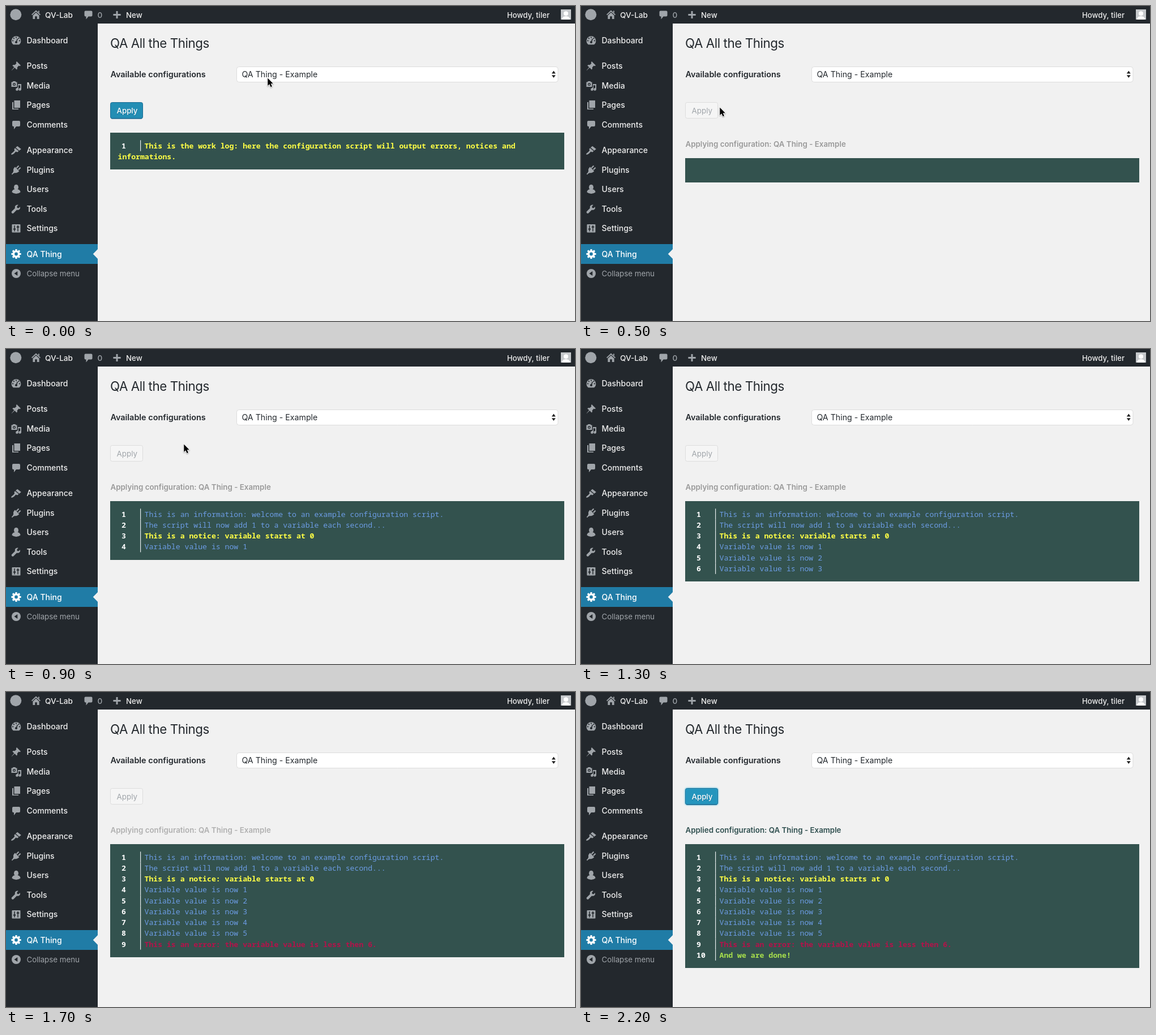
These frames come from a looping animation (1005x557 px, 2.4 s). An HTML page with a canvas:

```html
<!DOCTYPE html>
<html lang="en">
<head>
<meta charset="utf-8">
<title>QA All the Things</title>
<style>
html, body { margin: 0; width: 100%; height: 100%; overflow: hidden; background: #f1f1f1; }
canvas { display: block; width: 1005px; height: 557px; }
</style>
</head>
<body>
<canvas id="stage"></canvas>
<script>
const W = 1005, H = 557, LOOP = 2400, STEP = 100;
const SANS = 'Inter, Roboto, "Liberation Sans", sans-serif';
const MONO = '"Noto Sans Mono", "DejaVu Sans Mono", monospace';
const DARK = '#23282d', GREY = '#a0a5aa', PAGE = '#f1f1f1', BLUE = '#207ca6', SLATE = '#33524e';
const INFO = '#6c9ce4', NOTICE = '#ffff45', ERROR = '#b5124a', DONE = '#a8e04c';

const canvas = document.getElementById('stage');
const ctx = canvas.getContext('2d');
const dpr = window.devicePixelRatio || 1;
canvas.width = W * dpr;
canvas.height = H * dpr;

function text(str, x, y, color, size = 14, weight = 400, family = SANS) {
  ctx.font = `${weight} ${size}px ${family}`;
  ctx.fillStyle = color;
  ctx.fillText(str, x, y);
}

function rect(x, y, w, h, color) {
  ctx.fillStyle = color;
  ctx.fillRect(x, y, w, h);
}

function box(x, y, w, h, r, fill, stroke) {
  ctx.beginPath();
  ctx.roundRect(x, y, w, h, r);
  ctx.fillStyle = fill;
  ctx.fill();
  if (stroke) {
    ctx.strokeStyle = stroke;
    ctx.lineWidth = 1;
    ctx.stroke();
  }
}

function disc(x, y, r, color) {
  ctx.beginPath();
  ctx.arc(x, y, r, 0, Math.PI * 2);
  ctx.fillStyle = color;
  ctx.fill();
}

function shape(d, color) {
  ctx.fillStyle = color;
  ctx.fill(new Path2D(d));
}

function line(d, color, width) {
  ctx.strokeStyle = color;
  ctx.lineWidth = width;
  ctx.stroke(new Path2D(d));
}

function glow(color, blur, dy, draw) {
  ctx.save();
  ctx.shadowColor = color;
  ctx.shadowBlur = blur * dpr;
  ctx.shadowOffsetY = dy * dpr;
  draw();
  ctx.restore();
}

// Icons live in a 20 x 20 box.
const BUBBLE = 'M5 3h10q2 0 2 2v6q0 2-2 2h-5l-4 5v-5h-1q-2 0-2-2v-6q0-2 2-2z';
const icons = {
  dashboard() {
    shape('M4 16.6A8.4 8.4 0 1 1 16 16.6Q15.5 17.2 14.5 17.2H5.5Q4.5 17.2 4 16.6z', GREY);
    [[10, 4.6], [5.9, 6.2], [4.1, 10.4], [15.9, 10.4], [14.4, 6.2]].forEach(p => disc(...p, 1.1, DARK));
    disc(10, 13, 2.1, DARK);
    line('M10 13L12.4 7', DARK, 1.6);
  },
  pin() {
    shape('M11 2L18 9L16.4 10.2L14.6 9.6L11.8 12.4Q12.6 15 10.8 16.6L7.3 13.1L2 18L1.8 17.7L6.4 12.3L3.2 9.2Q5 7.5 7.6 8.2L10.4 5.4L9.8 3.4z', GREY);
  },
  media() {
    shape('M1.5 3.5h2l1-1.5h4l1 1.5h2v8.5h-10z', GREY);
    disc(6.5, 7.6, 2.5, DARK);
    disc(6.5, 7.6, 1.2, GREY);
    shape('M13 7h6v9.3a2.3 2.3 0 1 1-1.8-2.2V9.3h-3.2v7.2a2.4 2.4 0 1 1-2-2.4V13H13z', GREY);
  },
  pages() {
    shape('M6.5 2H17v13H6.5z M3 5h2v11.5h9V18H3z', GREY);
  },
  bubble() {
    shape(BUBBLE, GREY);
  },
  brush() {
    shape('M9 5.2L12.2 2.8L18.8 8L15.4 10.8z M8 6.2L14.4 11.6L12.2 13.6L9.2 12.4Q5.4 17.6 1.6 17.9Q.8 16.7 1.7 15.7Q5.5 13.3 7.2 10.6L6.4 8z', GREY);
  },
  plug() {
    shape('M8 4.6L15.3 12Q12.3 16 8 14.9L5.2 16.1L3 18.2L1.8 17L4 14.8L5.2 12Q4 7.8 8 4.6z', GREY);
    line('M10.5 6.4L14.5 2.5M13.8 9.6L17.6 5.8', GREY, 2.1);
  },
  user() {
    shape('M10 1.8a4 4.6 0 0 1 2.6 8.1q4.9 1.1 4.9 5.4q-3 2.7-7.5 2.7t-7.5-2.7q0-4.3 4.9-5.4A4 4.6 0 0 1 10 1.8z', GREY);
  },
  wrench() {
    shape('M16.8 5.9L14.2 8.4L11.7 7.9L11.2 5.5L13.8 2.8Q10.8 1.8 8.7 4Q7.2 5.8 7.9 8.4L1.9 14.4Q1.2 16 2.4 17.2Q3.7 18.3 5.1 17.4L11 11.5Q13.8 12.2 15.6 10.7Q17.7 8.7 16.8 5.9z', GREY);
  },
  sliders() {
    box(2.5, 3, 15, 14.5, 1, GREY);
    line('M7 5v10.5M13 5v10.5', DARK, 1.5);
    line('M4.8 11.6h4.4M10.8 7.7h4.4', DARK, 2);
  },
  gear() {
    for (let i = 0; i < 8; i++) {
      ctx.save();
      ctx.translate(10, 10);
      ctx.rotate(i * Math.PI / 4);
      shape('M-1.9-5L-1.5-8.6h3L1.9-5z', '#fff');
      ctx.restore();
    }
    disc(10, 10, 6.3, '#fff');
    disc(10, 10, 2.9, BLUE);
  },
  collapse() {
    disc(10, 10, 8, GREY);
    shape('M12.3 6v8L6.5 10z', DARK);
  },
  home() {
    shape('M10 2L18 9.6L16.8 10.8L10 4.5L3.2 10.8L2 9.6z M13.8 3h2v4l-2-2z M10 6L15.6 11.2V17.6H11.8V12.8H8.2V17.6H4.4V11.2z', GREY);
  },
  plus() {
    line('M10 3.4v13.2M3.4 10h13.2', GREY, 3);
  }
};

function icon(name, cx, cy) {
  ctx.save();
  ctx.translate(cx - 10, cy - 10);
  icons[name]();
  ctx.restore();
}

const menu = [
  ['Dashboard', 'dashboard', 61], ['Posts', 'pin', 106], ['Media', 'media', 141],
  ['Pages', 'pages', 175], ['Comments', 'bubble', 210], ['Appearance', 'brush', 255],
  ['Plugins', 'plug', 290], ['Users', 'user', 324], ['Tools', 'wrench', 359],
  ['Settings', 'sliders', 393], ['QA Thing', 'gear', 438.5]
];

function drawFrame() {
  rect(0, 0, W, H, PAGE);
  rect(0, 0, W, 31, DARK);
  rect(0, 0, 162, H, DARK);
  rect(0, 421, 162, 35, BLUE);
  shape('M162 430v17l-8.3-8.5z', PAGE);

  disc(17.3, 15.3, 10, GREY);
  icon('home', 53, 15.5);
  text('QV-Lab', 69, 20.5, '#eee', 13.6, 500);
  icon('bubble', 145.5, 15.5);
  text('0', 161.5, 20.5, GREY, 13.6, 500);
  icon('plus', 196, 15.5);
  text('New', 212, 20.5, '#eee', 13.3, 500);
  text('Howdy, tiler', 885, 20.5, '#eee', 13.2, 500);
  rect(980, 6, 18, 18, '#c6c9cc');
  disc(989, 13.2, 4, '#fff');
  shape('M982 24q0-6 7-6t7 6z', '#fff');

  for (const [label, name, y] of menu) {
    icon(name, 18, y);
    text(label, 36.5, y + 5, name === 'gear' ? '#fff' : '#eee', 14, 500);
  }
  icon('collapse', 18, 473);
  text('Collapse menu', 36.5, 478, GREY, 13.3);

  ctx.letterSpacing = '-0.4px';
  text('QA All the Things', 184, 74, DARK, 22.3);
  ctx.letterSpacing = '0px';
  text('Available configurations', 184.5, 125.5, DARK, 14.4, 600);
}

function drawSelect(focused) {
  const field = () => box(407.5, 107.5, 567.5, 27, 4, '#fff', focused ? '#5b9dd9' : '#dcdcdc');
  if (focused) glow('rgba(30,140,190,.8)', 3, 0, field);
  else field();
  text('QA Thing - Example', 416.5, 125.5, DARK, 14.2);
  shape('M963.8 119.4h7l-3.5-4.8z M963.8 122.2h7l-3.5 4.8z', '#222');
}

function drawOptions() {
  glow('rgba(0,0,0,.35)', 12, 4, () => box(397, 107, 569, 66.5, 5, '#ededed'));
  box(397, 107, 569, 66.5, 5, '#ededed', '#c2c2c2');
  line('M404.3 121.2l2.7 3.2l5-7', '#222', 1.5);
  ['Example', 'Failing Example', 'Fatal Error Example'].forEach((name, i) =>
    text('QA Thing - ' + name, 418.5, 125.3 + i * 19.4, '#222', 13.9));
}

function drawButton(state) {
  if (state === 'off') {
    box(184.5, 170.5, 57, 28, 3, '#f5f5f5', '#dddddd');
    text('Apply', 195.5, 189.5, GREY, 13.4);
    return;
  }
  const focused = state === 'focus';
  const face = () => box(184.5, 170.5, 57, 28.5, 3, focused ? '#2595bd' : '#238eb4', '#1c6c94');
  if (focused) glow('#33b3db', 3, 0, face);
  else face();
  rect(186, 198, 54, 1.5, '#1c6c94');
  glow('#1b6a90', 1, 1, () => text('Apply', 195.5, 189.5, '#fff', 13.3, 500));
}

const log = [
  [700, 'This is an information: welcome to an example configuration script.', INFO, 450],
  [700, 'The script will now add 1 to a variable each second...', INFO, 450],
  [700, 'This is a notice: variable starts at 0', NOTICE, 600],
  ...[1, 2, 3, 4, 5].map(n => [700 + n * 200, 'Variable value is now ' + n, INFO, 450]),
  [1700, 'This is an error: the variable value is less then 6.', ERROR, 600],
  [1900, 'And we are done!', DONE, 700]
];

function row(top, i, str, color, weight) {
  const y = top + 27.7 + i * 19.25;
  text(i + 1, 204, y, '#fff', 13.17, 700, MONO);
  text(str, 244.5, y, color, 13.17, weight, MONO);
  rect(237, top + 13.3 + i * 19.25, 1.2, 19.3, '#e8eeee');
}

function drawLog(t) {
  if (t < 500) {
    rect(184, 224, 802, 65, SLATE);
    row(224, 0, 'This is the work log: here the configuration script will output errors, notices and', NOTICE, 600);
    text('informations.', 197.5, 270.5, NOTICE, 13.17, 600, MONO);
    return;
  }
  const done = t >= 1900;
  const fade = Math.min(1, Math.max(0, (t - 1300) / 400));
  const shade = Math.round(153 + 23 * fade);
  text((done ? 'Applied' : 'Applying') + ' configuration: QA Thing - Example', 184.5, 249,
    done ? '#2f4f4f' : `rgb(${shade},${shade},${shade})`, 13.35, 600);

  const rows = log.filter(entry => t >= entry[0]);
  rect(184, 269, 802, rows.length ? Math.floor(27 + rows.length * 19.25) : 43, SLATE);
  rows.forEach(([, str, color, weight], i) => row(269, i, str, color, weight));
}

// Pointer tip: time, x, y
const track = [
  [0, 462, 127], [100, 467, 124], [200, 468, 124], [400, 246, 180],
  [500, 245, 179], [800, 314, 168], [1300, 314, 168]
];

function drawPointer(t) {
  const k = track.findIndex(p => p[0] > t);
  if (k < 0) return;
  const [t0, x0, y0] = track[k - 1], [t1, x1, y1] = track[k];
  const u = (t - t0) / (t1 - t0);
  ctx.save();
  ctx.translate(x0 + (x1 - x0) * u, y0 + (y1 - y0) * u);
  const arrow = 'M.3.5V14L3.4 11.2L5.6 16.2L7.9 15.2L5.7 10.3H9.8z';
  ctx.lineJoin = 'round';
  glow('rgba(0,0,0,.35)', 2, 1, () => line(arrow, '#fff', 1.8));
  shape(arrow, '#000');
  ctx.restore();
}

function render(now) {
  const t = Math.floor((now % LOOP) / STEP) * STEP;
  const open = t >= 100 && t < 300;
  ctx.setTransform(dpr, 0, 0, dpr, 0, 0);
  drawFrame();
  drawSelect(t >= 100 && t < 400);
  drawButton(t < 400 ? 'idle' : t >= 500 && t < 1900 ? 'off' : 'focus');
  drawLog(t);
  if (open) drawOptions();
  drawPointer(t);
}

const start = performance.now();
function tick() {
  render(performance.now() - start);
  requestAnimationFrame(tick);
}
tick();
</script>
</body>
</html>
```
